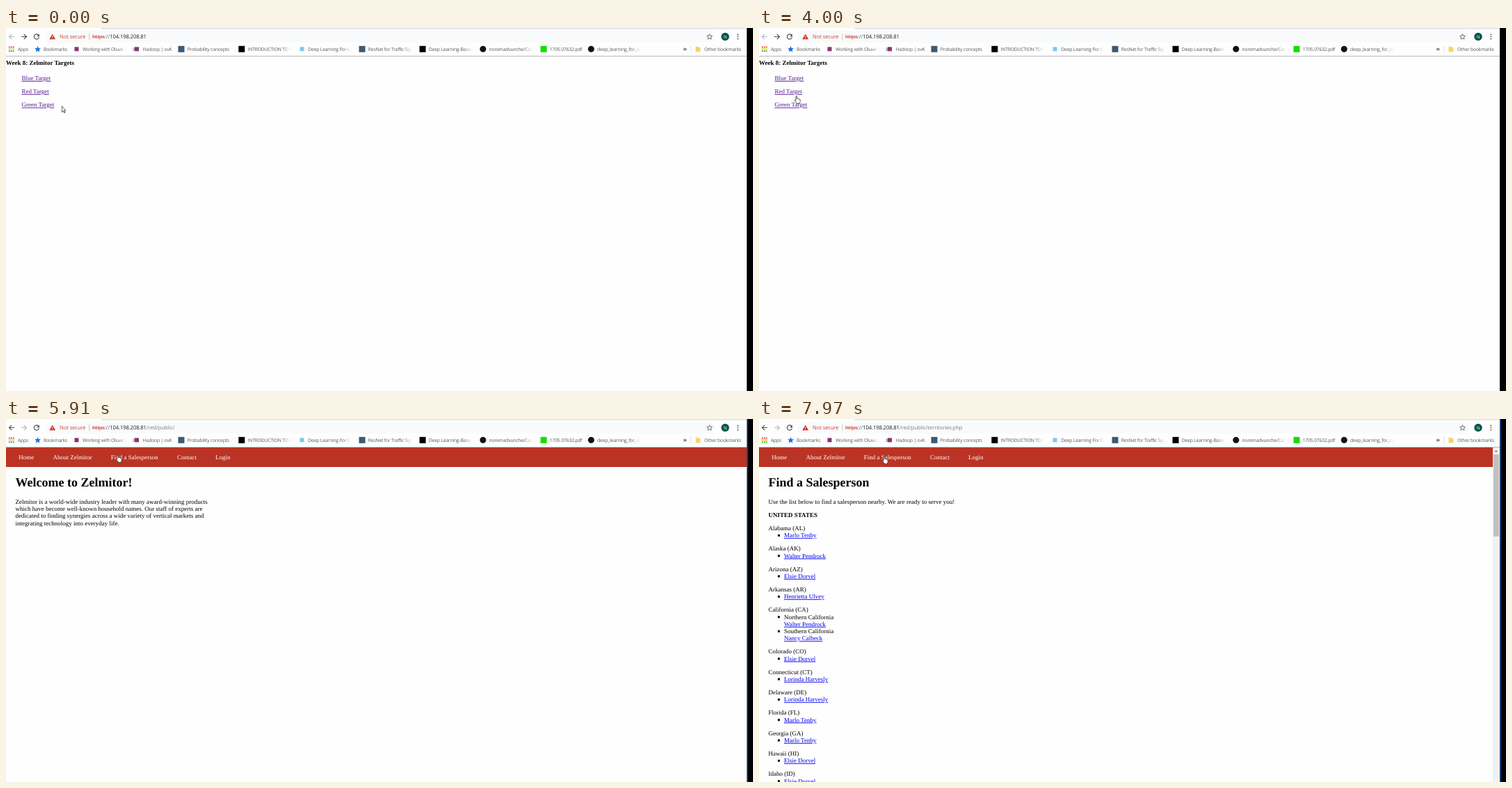
Animation of 1074 by 522 pixels, one loop 8 s. Source, as an HTML page:

```html
<!DOCTYPE html>
<html lang="en">
<head>
<meta charset="utf-8">
<title>Targets</title>
<style>
html, body { margin: 0; width: 100%; height: 100%; overflow: hidden; background: #fefefe; }
svg { display: block; text-rendering: geometricPrecision; }
.ui { font: 7.7px "Open Sans", "Noto Sans", sans-serif; letter-spacing: -.13px; fill: #202124; }
.marks { font-size: 6.8px; letter-spacing: -.2px; fill: #55585c; }
.page { font: 9px "Liberation Serif", "Times New Roman", serif; fill: #000; }
.page a, .link { fill: #551a8b; text-decoration: underline; }
.page .fresh { fill: #0000ee; }
.b { font-weight: bold; }
.h1 { font-size: 18px; font-weight: bold; }
.line { fill: none; stroke-width: 1.15; }

/* All states are hard changes on one 8 s clock */
.t { animation: 8s step-end infinite; }
.back { animation-name: back; }
.fwd { animation-name: fwd; }
.reload { animation-name: reload; }
.stop { animation-name: stop; }
.edge { animation-name: edge; }
.path { animation-name: path; }
.file { animation-name: file; }
.home { animation-name: home; }
.site { animation-name: site; }
.welcome { animation-name: welcome; }
.people { animation-name: people; }
.cursor { animation-name: move; }
.arrow { animation-name: arrow; }
.hand { animation-name: hand; }

@keyframes back { 0% { stroke: #b4b6b9 } 70.5%, 100% { stroke: #4a4d51 } }
@keyframes fwd { 0% { stroke: #4a4d51 } 70.5%, 100% { stroke: #b4b6b9 } }
@keyframes reload { 0%, 73.875%, 99.625%, 100% { opacity: 1 } 63.625%, 92.625% { opacity: 0 } }
@keyframes stop { 0%, 73.875%, 99.625%, 100% { opacity: 0 } 63.625%, 92.625% { opacity: 1 } }
@keyframes edge { 0% { opacity: 0 } 63.625%, 100% { opacity: 1 } }
@keyframes path { 0% { fill: transparent } 70.5%, 100% { fill: #7b8085 } }
@keyframes file { 0% { fill: transparent } 95.875%, 100% { fill: #7b8085 } }
@keyframes home { 0% { opacity: 1 } 73.875%, 100% { opacity: 0 } }
@keyframes site { 0% { opacity: 0 } 73.875%, 100% { opacity: 1 } }
@keyframes welcome { 0%, 99.625%, 100% { opacity: 0 } 73.875% { opacity: 1 } }
@keyframes people { 0% { opacity: 0 } 99.625%, 100% { opacity: 1 } }
@keyframes arrow { 0%, 70.5%, 75.5% { opacity: 1 } 8.75%, 73.875%, 84.125%, 100% { opacity: 0 } }
@keyframes hand { 0%, 70.5%, 75.5% { opacity: 0 } 8.75%, 73.875%, 84.125%, 100% { opacity: 1 } }
@keyframes move {
  0% { transform: translate(80px, 112px) }
  1.875% { transform: translate(68px, 104px) }
  3.5% { transform: translate(59px, 100px) }
  5.25% { transform: translate(60px, 98px) }
  6.75% { transform: translate(56px, 96px) }
  8.75% { transform: translate(50px, 94px) }
  50% { transform: translate(50px, 97px) }
  51.875% { transform: translate(51px, 98px) }
  55% { transform: translate(49.5px, 95px) }
  70.5% { transform: translate(78px, 88px) }
  72.125% { transform: translate(102px, 77px) }
  73.875% { transform: translate(157px, 51px) }
  75.5% { transform: translate(217px, 21px) }
  77.375% { transform: translate(242px, 32px) }
  80.375% { transform: translate(202px, 43px) }
  82.25% { transform: translate(182px, 48px) }
  84.125% { transform: translate(180px, 50px) }
  85.625% { transform: translate(178px, 52px) }
  87.25%, 100% { transform: translate(176px, 53px) }
}
</style>
</head>
<body>
<svg width="1074" height="522" viewBox="0 0 1074 522">
  <defs>
    <linearGradient id="fade">
      <stop offset="0" stop-color="#fefefe" stop-opacity="0"/>
      <stop offset=".58" stop-color="#fefefe"/>
    </linearGradient>
  </defs>
  <rect width="1074" height="522" fill="#fefefe"/>

  <g class="page t home">
    <text class="b" x="0" y="53">Week 8: Zelmitor Targets</text>
    <text class="link" x="22.5" y="75">Blue Target</text>
    <text class="link" x="22.5" y="94.2">Red Target</text>
    <text class="link" x="22.5" y="113.4">Green Target</text>
  </g>

  <g class="page t site">
    <rect y="41" width="1065" height="28" fill="#bb3324"/>
    <g fill="#fff">
      <text x="18.3" y="58.3">Home</text>
      <text x="67.5" y="58.3">About Zelmitor</text>
      <text x="150.7" y="58.3">Find a Salesperson</text>
      <text x="246" y="58.3">Contact</text>
      <text x="301" y="58.3">Login</text>
    </g>
  </g>

  <g class="page t welcome">
    <text class="h1" x="13.5" y="97">Welcome to Zelmitor!</text>
    <text x="13.5" y="122">Zelmitor is a world-wide industry leader with many award-winning products</text>
    <text x="13.5" y="132.2">which have become well-known household names. Our staff of experts are</text>
    <text x="13.5" y="142.4">dedicated to finding synergies across a wide variety of vertical markets and</text>
    <text x="13.5" y="152.6">integrating technology into everyday life.</text>
  </g>

  <g class="page t people">
    <text class="h1" x="13.5" y="97">Find a Salesperson</text>
    <text x="13.5" y="122">Use the list below to find a salesperson nearby. We are ready to serve you!</text>
    <text class="b" x="13.5" y="141">UNITED STATES</text>
    <g id="list"></g>
    <rect x="1055" y="41" width="10" height="481" fill="#f1f1f1"/>
    <rect x="1056" y="51" width="8" height="118" fill="#c1c1c1"/>
    <path d="M1057.5 47.3l2.3-2.6 2.3 2.6z" fill="#777"/>
  </g>

  <g class="ui">
    <rect width="1065" height="40" fill="#fefefe"/>
    <rect x="137" width="928" height="1.6" fill="#dee1e6"/>
    <rect y="40" width="1065" height="1" fill="#b8b8b8"/>
    <rect x="56" y="4" width="964" height="17" rx="8.5" fill="#f9fafb"/>
    <path class="line t back" d="M12 12.5H4.6M8.2 8.8l-3.7 3.7 3.7 3.7"/>
    <path class="line t fwd" d="M22 12.5h7.4M25.8 8.8l3.7 3.7-3.7 3.7"/>
    <g class="t reload">
      <path class="line" stroke="#4a4d51" d="M46.6 10a3.6 3.6 0 1 0 .9 3.4"/>
      <path d="M47.9 8.4v3.8h-3.8z" fill="#4a4d51"/>
    </g>
    <path class="line t stop" stroke="#4a4d51" d="M41 9.5l6 6m0-6l-6 6"/>
    <path d="M66.7 8.6l4.4 7.7h-8.8z" fill="#d93025"/>
    <path d="M66.7 11.2v2.4m0 .7v1" stroke="#fff" stroke-width=".9"/>
    <text x="77" y="15.3" fill="#d0453c">Not secure</text>
    <rect x="119.5" y="8" width=".8" height="9" fill="#b5b8bc"/>
    <text x="124" y="15.3"><tspan fill="#d0453c" text-decoration="line-through">https</tspan><tspan fill="#6b6f74">://</tspan>104.198.208.81<tspan class="t path">/red/public/</tspan><tspan class="t file">territories.php</tspan></text>
    <path d="M1011.5 8.7l1.15 2.5 2.75.3-2.05 1.85.6 2.7-2.45-1.4-2.45 1.4.6-2.7-2.05-1.85 2.75-.3z" fill="none" stroke="#4a4d51" stroke-width=".8"/>
    <circle cx="1034" cy="12.5" r="5.7" fill="#00564a"/>
    <text x="1034" y="14.8" text-anchor="middle" font-size="6.2" style="fill:#fff">N</text>
    <g fill="#4a4d51">
      <circle cx="1052.3" cy="9.5" r=".9"/><circle cx="1052.3" cy="12.6" r=".9"/><circle cx="1052.3" cy="15.7" r=".9"/>
    </g>

    <g class="marks">
      <g id="apps"></g>
      <path d="M45.6 26l1.3 2.9 3.1.3-2.3 2.1.7 3.1-2.8-1.6-2.8 1.6.7-3.1-2.3-2.1 3.1-.3z" fill="#1a73e8"/>
      <text x="17" y="32.7">Apps</text>
      <text x="54" y="32.7">Bookmarks</text>
      <g id="marks"></g>
      <text x="973.5" y="32.7" font-size="9" font-weight="bold">»</text>
      <rect x="984.5" y="25" width=".8" height="10" fill="#d5d7da"/>
      <path d="M991.5 26.5h3l1 1.2h2.8v6.6h-6.8z" fill="#f6d365"/>
      <text x="1004" y="32.7">Other bookmarks</text>
    </g>
  </g>

  <rect x="1065" width="9" height="522" fill="#000"/>
  <rect class="t edge" x="1065" width="2" height="522" fill="#123f7a"/>

  <g class="t cursor" fill="#fff" stroke="#222" stroke-width=".75" stroke-linejoin="round">
    <path class="t arrow" d="M.4.5v8.6l2-1.8 1.3 2.8 1.2-.6-1.3-2.7h2.5z"/>
    <path class="t hand" d="M3 6.8V1.6q0-1 .8-1t.8 1v3q1-.6 1.6.2 1-.5 1.5.4 1.5-.3 1.5 1v2.2q0 1.4-.8 2.1v1.1H4.2v-1L1.3 7.6q-.4-1 .5-1.1.6 0 1.2.9z"/>
  </g>
</svg>
<script>
const NS = "http://www.w3.org/2000/svg";
const get = id => document.getElementById(id);

function add(parent, tag, attrs, text) {
  const el = document.createElementNS(NS, tag);
  for (const k in attrs) el.setAttribute(k, attrs[k]);
  if (text) el.textContent = text;
  parent.appendChild(el);
}

// Apps grid
const dots = ["#ea4335", "#fbbc04", "#34a853"];
for (let i = 0; i < 9; i++) {
  const col = i % 3, row = (i - col) / 3;
  add(get("apps"), "rect", { x: 4 + col * 2.9, y: 26.5 + row * 2.9, width: 1.9, height: 1.9, fill: dots[row] });
}

// Bookmarks: title, colour, icon size, round icon, faded end
const marks = [
  ["Working with Oluve Studio", "#84376f", 6, 0, 1],
  ["Hadoop | ovK", "#84376f", 6, 0, 0],
  ["Probability concepts", "#3c5a76", 9, 0, 0],
  ["INTRODUCTION TO ML", "#000", 9, 0, 1],
  ["Deep Learning For Co", "#7cc8ea", 6, 0, 1],
  ["ResNet for Traffic Sign", "#3c5a76", 9, 0, 1],
  ["Deep Learning-Based", "#000", 9, 0, 1],
  ["noremadvunche/Car", "#111", 9, 1, 1],
  ["1705.07632.pdf", "#12e000", 9, 0, 0],
  ["deep_learning_for_cars", "#111", 9, 1, 1]
];
const iconX = [101.5, 188, 252, 338.8, 425.5, 512, 599, 685.8, 773, 841.3];
marks.forEach(([title, fill, size, round, fade], i) => {
  const g = get("marks"), cx = iconX[i], x = cx + 8.8;
  add(g, "text", { x, y: 32.7 }, title);
  if (fade) add(g, "rect", { x: x + 50, y: 24, width: 22, height: 13, fill: "url(#fade)" });
  add(g, "rect", { x: cx - size / 2, y: 30.3 - size / 2, width: size, height: size, rx: round * size / 2, fill });
});

// Sales list: "*" opens a bulleted line, "_" a plain indented one
const [tenby, pend, dorvel, ulvey, cal, harv] =
  ["Marlo Tenby", "Walter Pendrock", "Elsie Dorvel", "Henrietta Ulvey", "Nancy Calbeck", "Lorinda Harvesly"];
const states = [
  ["Alabama (AL)", tenby], ["Alaska (AK)", pend], ["Arizona (AZ)", dorvel], ["Arkansas (AR)", ulvey],
  ["California (CA)", "*Northern California", "_" + pend, "*Southern California", "_" + cal],
  ["Colorado (CO)", dorvel], ["Connecticut (CT)", harv], ["Delaware (DE)", harv], ["Florida (FL)", tenby],
  ["Georgia (GA)", tenby], ["Hawaii (HI)", dorvel], ["Idaho (ID)", dorvel]
];
let y = 160;
for (const [state, ...rows] of states) {
  const g = get("list");
  add(g, "text", { x: 13.5, y }, state);
  for (const row of rows) {
    y += 10.25;
    const region = row[0] === "*";
    if (row[0] !== "_") add(g, "rect", { x: 27, y: y - 4.3, width: 3, height: 3 });
    add(g, "text", { x: 36, y, class: region ? "" : "link fresh" }, row.replace(/^[*_]/, ""));
  }
  y += 19.07;
}
</script>
</body>
</html>
```
